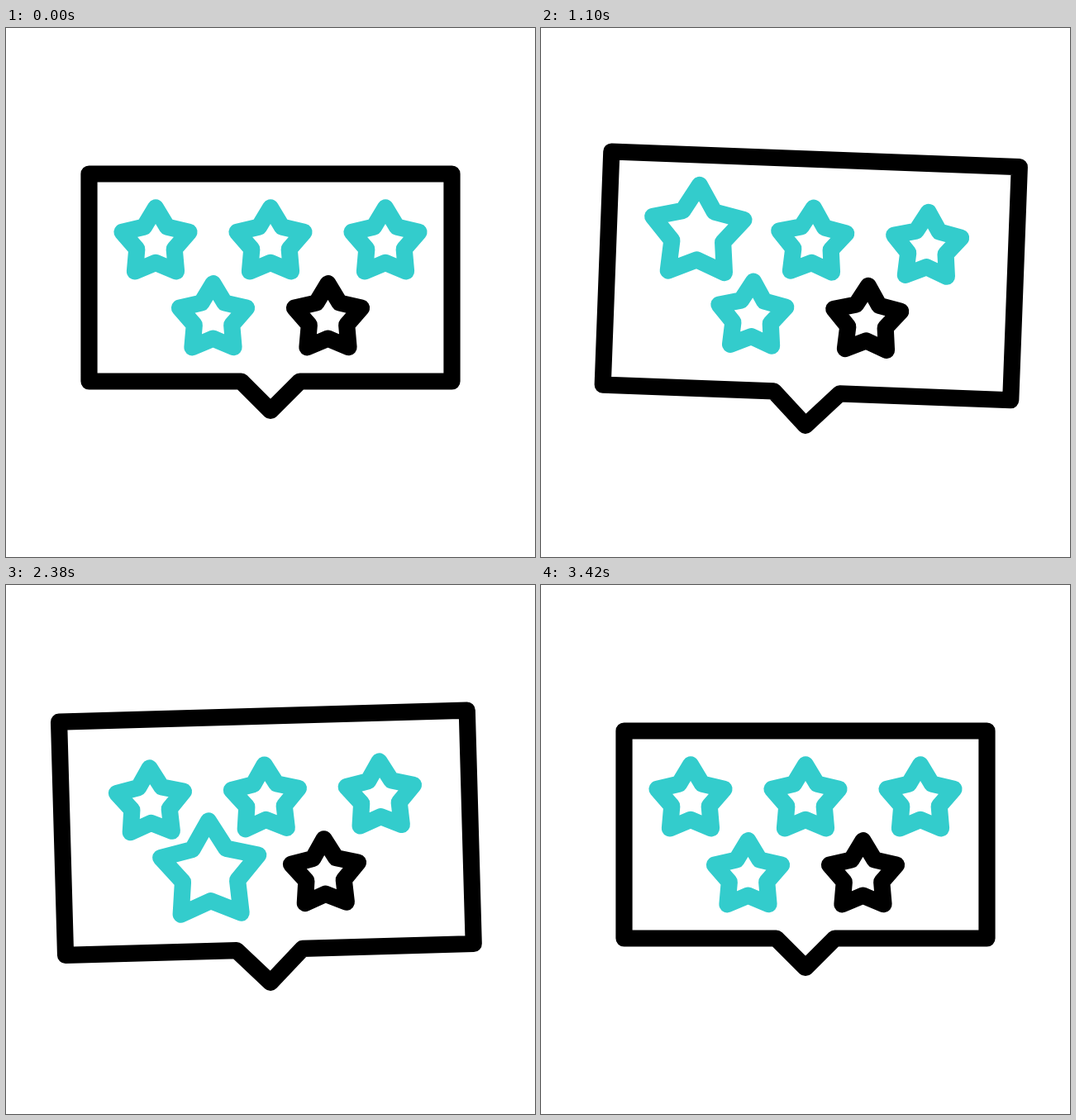
An HTML page with a canvas that plays this animation: 640x640 px, repeating every 3.6 s.

```html
<!DOCTYPE html>
<html lang="en">
<head>
<meta charset="utf-8">
<title>Star rating bubble</title>
<style>
  html, body { margin: 0; width: 100%; height: 100%; overflow: hidden; background: #fff; }
  canvas { display: block; width: 100vw; height: 100vh; }
</style>
</head>
<body>
<canvas id="stage" width="640" height="640"></canvas>
<script>
const ctx = document.getElementById('stage').getContext('2d');
const LOOP = 3600, BEAT = 400, TEAL = '#33cccc', BLACK = '#000';
const PIVOT = { x: 320, y: 480 };
const SWING = 4.35, LAST_SWING = 4.7, PULSE = .48, RADIUS = 42.6;

// Right half of the bubble, from the top corner to the tip
const HALF = [[219.5, -143.5], [219.5, 107.5], [35.5, 107.5], [0, 143]];
const BUBBLE = [...HALF, ...HALF.slice(0, 3).reverse().map(([x, y]) => [-x, y])];

// Direction in degrees and reach of the spark beside each teal star
const SPARKS = [[-142, 83], [-90, 93], [-31, 88], [155, 81]];

const STARS = Array.from({ length: 5 }, (_, i) => ({
  x: i < 3 ? 181 + 139 * i : 250.5 + 139 * (i - 3),
  y: i < 3 ? 260 : 351.8,
  start: BEAT * (i + 2),
  spark: SPARKS[i],
  color: i < 4 ? TEAL : BLACK
}));

const ramp = (t, from, to) => Math.min(1, Math.max(0, (t - from) / (to - from)));
const smooth = u => u * u * (3 - 2 * u);
const tent = (t, from, peak, to, fall = u => u) => ramp(t, from, peak) * (1 - fall(ramp(t, peak, to)));
const settle = t => ramp(t, 2800, 3380);

function swing(t) {
  if (t < 600) return -SWING * ramp(t, 0, 600) ** 2;
  if (t < 2200) {
    const u = (t - 600) / (2 * BEAT) % 1;
    return SWING * (1 - 4 * Math.abs(u - .5));
  }
  const last = -SWING + (SWING + LAST_SWING) * ramp(t, 2200, 2800);
  return last * (1 - settle(t));
}

function outline(points, color, closed) {
  ctx.beginPath();
  points.forEach(([x, y]) => ctx.lineTo(x, y));
  if (closed) ctx.closePath();
  ctx.strokeStyle = color;
  ctx.stroke();
}

function starPoints(x, y, radius) {
  return Array.from({ length: 10 }, (_, i) => {
    const r = i % 2 ? radius * .56 : radius, a = i * Math.PI / 5;
    return [x + r * Math.sin(a), y - r * Math.cos(a)];
  });
}

function drawSpark({ x, y, spark: [angle, reach] }, t) {
  const a = angle * Math.PI / 180;
  const ends = [ramp(t, 400, 600), ramp(t, 200, 400)].map(u => {
    const r = reach * (.6 + .4 * u);
    return [x + r * Math.cos(a), y + r * Math.sin(a)];
  });
  outline(ends, TEAL);
}

function drawStar(star, t) {
  const { x, y, start, spark, color } = star;
  let size = 1 + PULSE * tent(t, start, start + BEAT, start + 2 * BEAT, smooth);
  if (spark) size += PULSE * tent(t, 60, 400, 620);
  if (spark && t > 200 && t < 600) drawSpark(star, t);
  const hop = 7 * Math.sin(Math.PI * ramp(t, start, start + 600));
  outline(starPoints(x, y - hop, RADIUS * size), color, true);
}

function draw(now) {
  const t = now % LOOP;
  const grow = 1 + .125 * ramp(t, 60, 560) * (1 - settle(t));
  const lift = 23 * tent(t, 2800, 3000, 3400);
  ctx.setTransform(1, 0, 0, 1, 0, 0);
  ctx.fillStyle = '#fff';
  ctx.fillRect(0, 0, 640, 640);
  ctx.lineWidth = 20.2;
  ctx.lineCap = ctx.lineJoin = 'round';

  ctx.translate(PIVOT.x, PIVOT.y - lift);
  ctx.rotate(swing(t) * Math.PI / 180);
  ctx.translate(-PIVOT.x, -PIVOT.y);

  outline(BUBBLE.map(([x, y]) => [320 + x * grow, 320 + y * grow]), BLACK, true);
  STARS.forEach(star => drawStar(star, t));
}

function loop() {
  draw(performance.now());
  requestAnimationFrame(loop);
}
loop();
</script>
</body>
</html>
```
